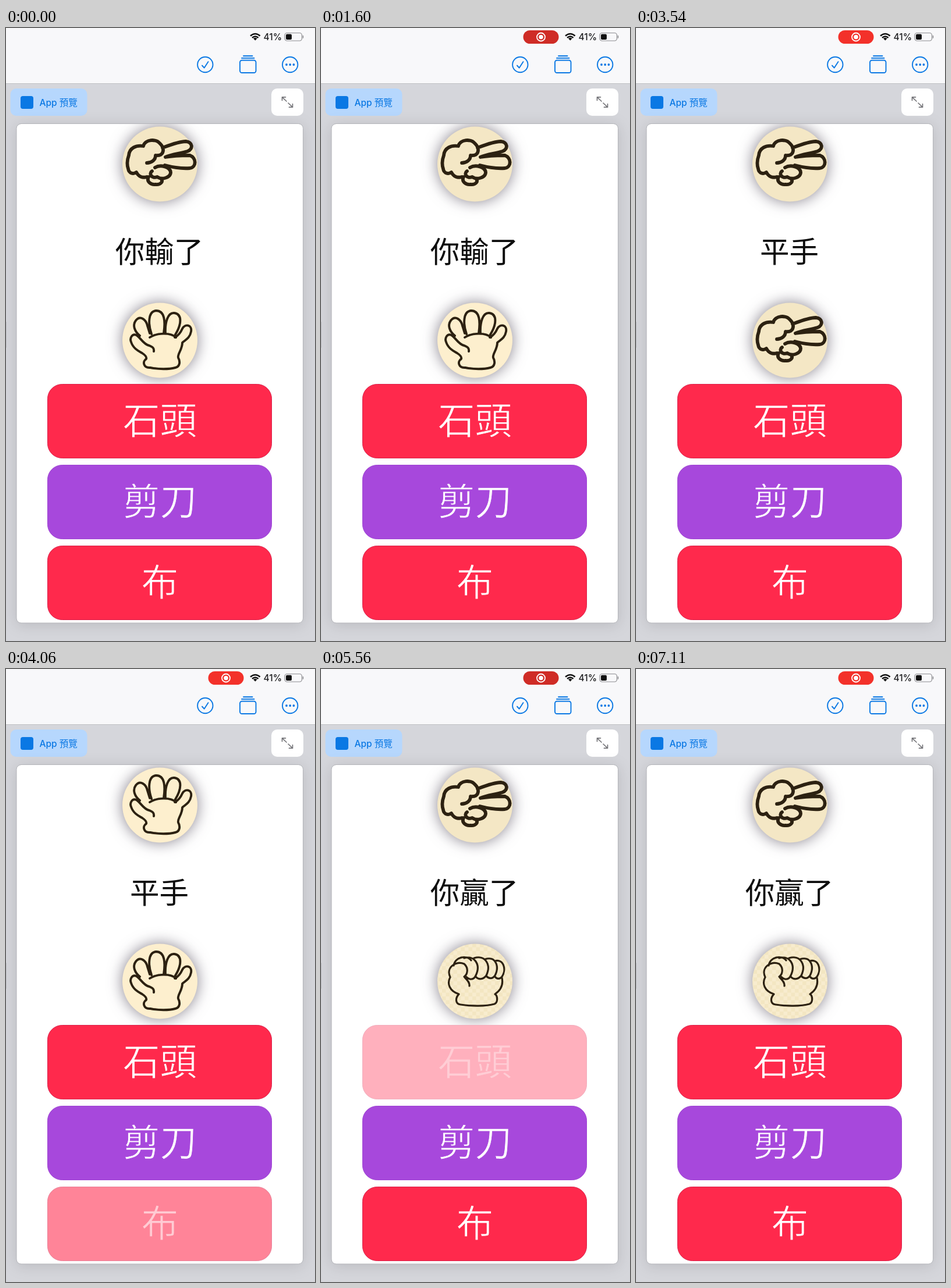
Write an HTML page that moves like this. It is 531 px wide and 1054 px high and loops after 7150 ms.

```html
<!DOCTYPE html>
<html lang="zh-Hant">
<head>
<meta charset="utf-8">
<style>
html, body { margin: 0; width: 100%; height: 100%; overflow: hidden; background: #d5d6db; }
svg { display: block; width: 100vw; height: 100vh; }
text { font-family: "Noto Sans CJK TC", "Noto Sans CJK", sans-serif; }
.ui { font-family: Inter, "Noto Sans CJK TC", "Noto Sans CJK", sans-serif; font-weight: 500; }
.line { fill: none; stroke-linecap: round; stroke-linejoin: round; }
.blue { stroke: #0a78e4; stroke-width: 1.9; }
.ink { stroke: #2c2111; }
.disc { filter: drop-shadow(0 0 13px rgba(40, 30, 50, .56)); }
.card { filter: drop-shadow(0 3px 12px rgba(0, 0, 0, .13)); }

/* --a is the button's opacity; the label's outline in the button colour thins its strokes */
.button { --face: color-mix(in srgb, var(--fill) var(--a), white); }
.button rect { fill: var(--face); stroke: color-mix(in srgb, var(--edge) var(--a), white); }
.button text { fill: color-mix(in srgb, white var(--a), var(--face)); stroke: var(--face); stroke-width: .9; }
</style>
</head>
<body>
<svg viewBox="0 0 531 1054" preserveAspectRatio="none">
  <defs>
    <pattern id="checks" width="13" height="13" patternUnits="userSpaceOnUse">
      <path fill="#f8ecce" d="M0 0h13v13h-13z"/>
      <path fill="#f3e6c2" d="M0 0h6.5v6.5h-6.5zM6.5 6.5h6.5v6.5h-6.5z"/>
    </pattern>
    <clipPath id="inside"><rect x="18" y="165" width="492.5" height="858" rx="8"/></clipPath>
    <g id="scissors">
      <circle cx="264.5" cy="234" r="64.5" fill="#f4e7c5" class="disc"/>
      <path class="line ink" stroke-width="5.8" d="M236 203C224 201 212 206 211 219C208 227 208 236 210 242C211 250 219 252 224 248C228 256 235 258 242 256
        M236 203C239 191 258 190 265 199C273 207 272 221 257 219C257 227 250 232 242 232
        M269 206C282 201 297 195 309 195C321 196 322 208 312 212C299 216 285 217 274 222C289 219 303 219 316 219C327 223 328 239 316 241C302 242 288 240 273 236
        M256 240C266 234 282 239 283 248C283 257 268 262 260 256C250 260 245 250 251 246M245 256C241 264 249 270 257 269C266 270 270 264 267 260"/>
    </g>
    <g id="paper">
      <circle cx="264.5" cy="234" r="64.5" fill="#fdefce" class="disc"/>
      <path class="line ink" stroke-width="3.9" d="M254 253C255 246 250 245 246 243C236 241 231 229 224 225C217 222 212 230 215 237C219 249 229 253 234 256C240 260 242 263 241 266C234 270 236 282 248 281C262 284 280 284 291 281C300 279 299 269 296 264C294 258 303 250 303 238C309 233 316 230 318 219C320 207 308 205 303 214C300 221 296 226 290 229
        M230 226C221 219 217 208 223 200C231 190 241 199 243 209L247 222
        M250 223C244 206 244 184 258 183C273 183 274 202 271 222M274 222C273 203 278 186 289 187C304 189 301 208 291 224
        M247 229C259 221 283 220 292 229"/>
    </g>
    <g id="rock">
      <circle cx="264.5" cy="234" r="64.5" fill="url(#checks)" class="disc"/>
      <path class="line ink" stroke-width="3.2" d="M222 227C216 238 221 251 237 256C231 262 230 273 240 274C258 277 284 277 298 273C305 270 303 258 299 256C311 248 313 238 311 228
        M228 207C230 192 250 188 258 198
        M222 227C214 210 232 198 246 204C254 211 252 222 246 226C249 231 256 234 255 242
        M246 194C264 189 275 205 266 224C262 233 254 231 249 226M263 194C282 188 293 205 284 224C278 232 270 231 266 226M282 196C300 190 307 208 299 224C294 231 288 229 284 225M299 199C314 195 319 214 311 226C307 231 302 230 299 226"/>
    </g>
  </defs>

  <rect width="531" height="95" fill="#f8f8fa"/>
  <path class="line" stroke="#bfc0c4" d="M0 95.5H531"/>
  <path class="line" stroke="#bfc0c5" stroke-width="2" d="M0 506V549"/>

  <g id="pill">
    <rect id="pillBox" x="347.5" y="4" width="61" height="23" rx="11.5"/>
    <circle class="line" cx="378" cy="15.5" r="7" stroke="#fff" stroke-width="1.8"/>
    <circle cx="378" cy="15.5" r="3.8" fill="#fff"/>
  </g>
  <path class="line" stroke="#111" stroke-width="2.5" style="stroke-linecap:butt" d="M420 13.5Q428.3 6.5 436.6 13.5M423 16.7Q428.3 12.3 433.6 16.7"/>
  <path fill="#111" d="M425 18Q428.3 15.5 431.6 18L428.3 21.5z"/>
  <text class="ui" x="442.5" y="20.8" font-size="15.5" fill="#1b1b1d">41%</text>
  <rect class="line" x="479" y="8.5" width="29.5" height="13.5" rx="4" stroke="#8c8c90" stroke-width="1.2"/>
  <rect x="481" y="10.5" width="10" height="9.5" rx="2" fill="#111"/>
  <path class="line" stroke="#8c8c90" stroke-width="1.5" d="M510.5 13.5V17"/>

  <g class="line blue">
    <circle cx="342.3" cy="63" r="13.2"/><path d="M337 64.5L340.7 68.5L347.5 58"/>
    <rect x="402" y="55.5" width="27.5" height="21.5" rx="3.5"/><path d="M405 51.7H426.5M408 48H423.5"/>
    <circle cx="488.2" cy="63" r="13.2"/>
  </g>
  <g fill="#0a78e4"><circle cx="482" cy="63" r="1.9"/><circle cx="488.2" cy="63" r="1.9"/><circle cx="494.4" cy="63" r="1.9"/></g>

  <rect x="7.5" y="104" width="132" height="47" rx="10" fill="#b6d7fd"/>
  <rect x="25" y="117" width="22" height="22" rx="4" fill="#0a78e4"/>
  <text class="ui" x="57.5" y="134" font-size="15.5" fill="#0a78e4">App 預覽</text>
  <rect x="456" y="104" width="55" height="47" rx="10" fill="#fff"/>
  <path class="line" stroke="#77777b" stroke-width="1.7" d="M482 126L474.5 118.800M474.5 124.5V118.8H480.5M485 129L492.5 136.2M492.5 130.5V136.2H486.5"/>

  <rect class="card" x="18" y="165" width="492.5" height="858" rx="8" fill="#fff"/>
  <g clip-path="url(#inside)">
    <use id="rival"/>
    <use id="mine" y="303"/>
    <text id="verdict" x="263.5" y="403.3" font-size="50.5" text-anchor="middle" fill="#0d0d0d"></text>
    <g id="buttons"></g>
  </g>
  <rect class="line" x="18" y="164.5" width="492.5" height="858.5" rx="8" stroke="#b4b5ba"/>
</svg>
<script>
const LOOP = 7150;
const $ = id => document.getElementById(id);
const clamp = v => Math.min(1, Math.max(0, v));
const mix = (a, b, k) => a + (b - a) * k;

const rounds = [
  { at: -1e4, rival: 'scissors', mine: 'paper', verdict: '你輸了', button: 2 },
  { at: 2365, rival: 'scissors', mine: 'scissors', verdict: '平手', button: 1 },
  { at: 3870, rival: 'paper', mine: 'paper', verdict: '平手', button: 2 },
  { at: 5442, rival: 'scissors', mine: 'rock', verdict: '你贏了', button: 0 }
];

$('buttons').innerHTML = [
  ['石頭', '#ff294c', '#d92049'],
  ['剪刀', '#a748dc', '#9d43d2'],
  ['布', '#ff294c', '#d92049']
].map(([label, fill, edge], i) => `<g class="button" style="--fill:${fill};--edge:${edge}" transform="translate(0 ${139 * i})">
  <rect x="71.5" y="612.5" width="385" height="127" rx="25"/>
  <text x="264.5" y="698" font-size="63.5" text-anchor="middle">${label}</text>
</g>`).join('');
const buttons = [...$('buttons').children];

// Quick dim while touched, slower recovery after release
function pressAlpha(d) {
  if (d < 0) return mix(1, .2, clamp((d + 100) / 100));
  const k = clamp(d / 400);
  return mix(.2, 1, k * k * (3 - 2 * k));
}

function draw(t) {
  const now = rounds.filter(r => r.at <= t).pop();
  $('rival').setAttribute('href', '#' + now.rival);
  $('mine').setAttribute('href', '#' + now.mine);
  $('verdict').textContent = now.verdict;

  buttons.forEach((b, i) => {
    const alpha = Math.min(...rounds.filter(r => r.button === i).map(r => pressAlpha(t - r.at)));
    b.style.setProperty('--a', alpha * 100 + '%');
  });

  const dip = ((1 + Math.cos((t - 1630) / 3960 * 2 * Math.PI)) / 2) ** 3;
  $('pill').setAttribute('opacity', clamp((t - 69) / 200));
  $('pillBox').setAttribute('fill', `rgb(${mix(243, 207, dip)},${mix(49, 44, dip)},${mix(42, 38, dip)})`);
}

const start = performance.now();
function tick() {
  draw((performance.now() - start) % LOOP);
  requestAnimationFrame(tick);
}
tick();
</script>
</body>
</html>
```
